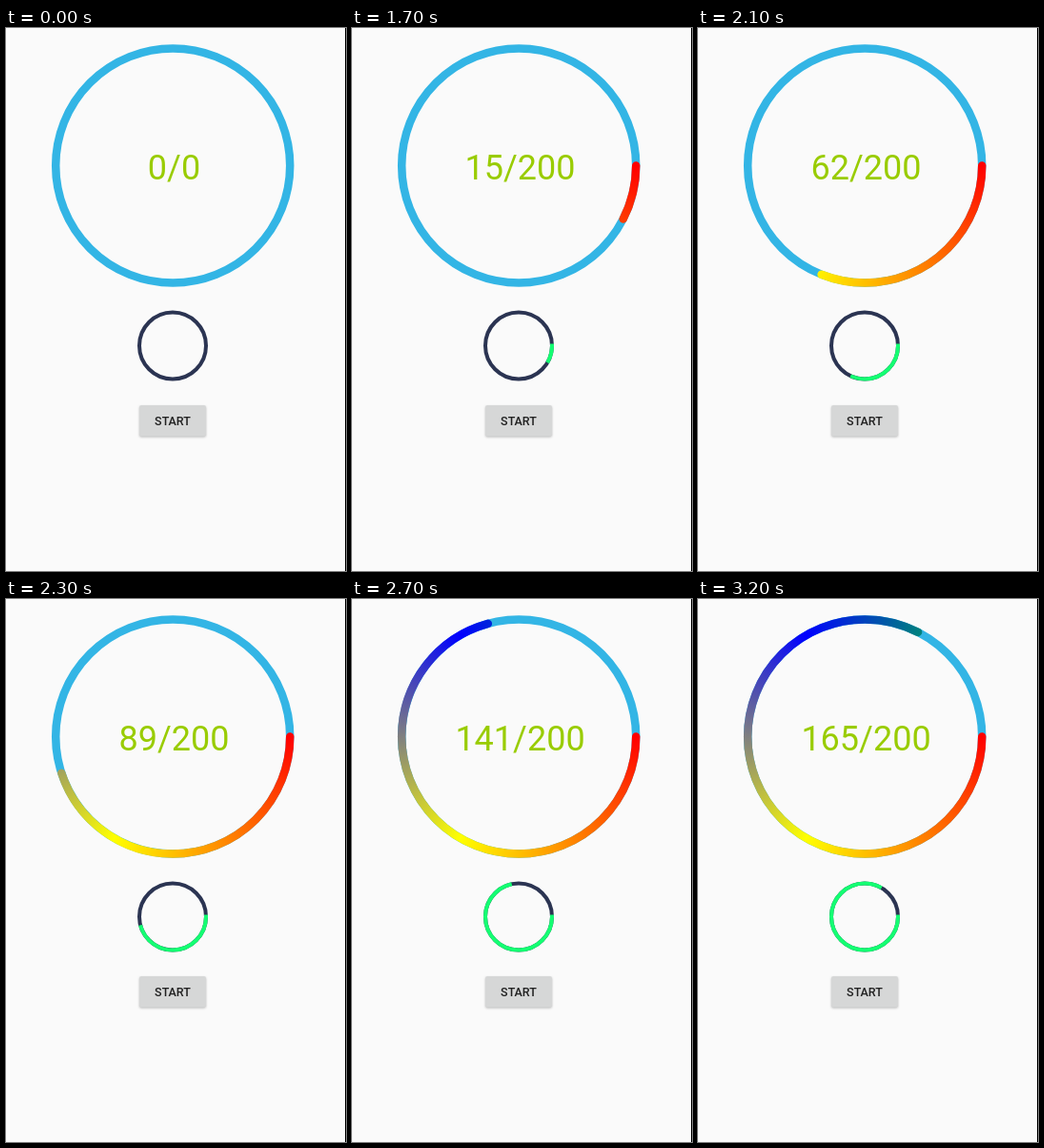
Recreate the animation shown at these times as an HTML page with a canvas. Size 357x570 px, loop 4.4 s.

```html
<!DOCTYPE html>
<html lang="en">
<head>
<meta charset="utf-8">
<title>Circular progress</title>
<style>
  html, body { margin: 0; width: 100%; height: 100%; overflow: hidden; background: #fafafa; }
  canvas, svg { position: absolute; left: 0; top: 0; display: block; }
  text { font-family: Roboto, sans-serif; text-anchor: middle; }
</style>
</head>
<body>
<canvas id="rings" width="357" height="570"></canvas>
<svg width="357" height="570">
  <text id="counter" x="176.5" y="159" font-size="36" fill="#99cc00">0/0</text>
  <rect id="button" x="140" y="396" width="70" height="32.5" rx="2" fill="#d6d7d7"/>
  <text x="175" y="417" font-size="12.5" font-weight="500" fill="#212121">START</text>
  <rect x="356" width="1" height="570" fill="#000"/>
</svg>
<script>
const LOOP = 4400, STEP = 100, PRESS = 1300;
const GOAL = 165, MAX = 200;
const ctx = document.getElementById('rings').getContext('2d');
const counter = document.getElementById('counter');
const button = document.getElementById('button');

const rainbow = ctx.createConicGradient(0, 175.2, 144.5);
[[0, '#f00'], [1 / 3, '#ff0'], [2 / 3, '#00f'], [0.985, '#0f0'], [0.985, '#f00'], [1, '#f00']]
  .forEach(([offset, color]) => rainbow.addColorStop(offset, color));

const bigRing = { x: 175.2, y: 144.5, r: 123, width: 8.5, track: '#33b5e5', fill: rainbow, cap: 'round' };
const smallRing = { x: 175, y: 333.5, r: 35, width: 4, track: '#2b3452', fill: '#14ff72', cap: 'square' };

function arc(ring, angle, color, cap) {
  ctx.beginPath();
  ctx.arc(ring.x, ring.y, ring.r, 0, angle);
  ctx.lineWidth = ring.width;
  ctx.lineCap = cap;
  ctx.strokeStyle = color;
  ctx.stroke();
}

function drawRing(ring, value) {
  arc(ring, 2 * Math.PI, ring.track, 'butt');
  if (value > 0) arc(ring, value / MAX * 2 * Math.PI, ring.fill, ring.cap);
}

// The progress advances on display ticks: 120 of them, sampled every 20/3.
function progressAt(step) {
  if (step < 1) return 0;
  const ticks = Math.floor((20 * step - 10) / 3) + 0.45;
  const x = Math.min(1, ticks / 120);
  return GOAL * (1 - Math.cos(Math.PI * x)) / 2;
}

function render(time) {
  const step = Math.floor((time - PRESS) / STEP);
  const value = progressAt(step);
  ctx.clearRect(0, 0, 357, 570);
  drawRing(bigRing, value);
  drawRing(smallRing, value);
  counter.textContent = step < 0 ? '0/0' : `${Math.floor(value)}/${MAX}`;
  const lift = step < 0 ? 0 : Math.max(0, 1 - step / 3);
  button.style.filter =
    `drop-shadow(0 ${1 + lift}px ${0.8 + lift}px rgba(0,0,0,${0.25 + 0.08 * lift}))`;
}

const start = performance.now();
function frame() {
  render((performance.now() - start) % LOOP);
  requestAnimationFrame(frame);
}
frame();
</script>
</body>
</html>
```
